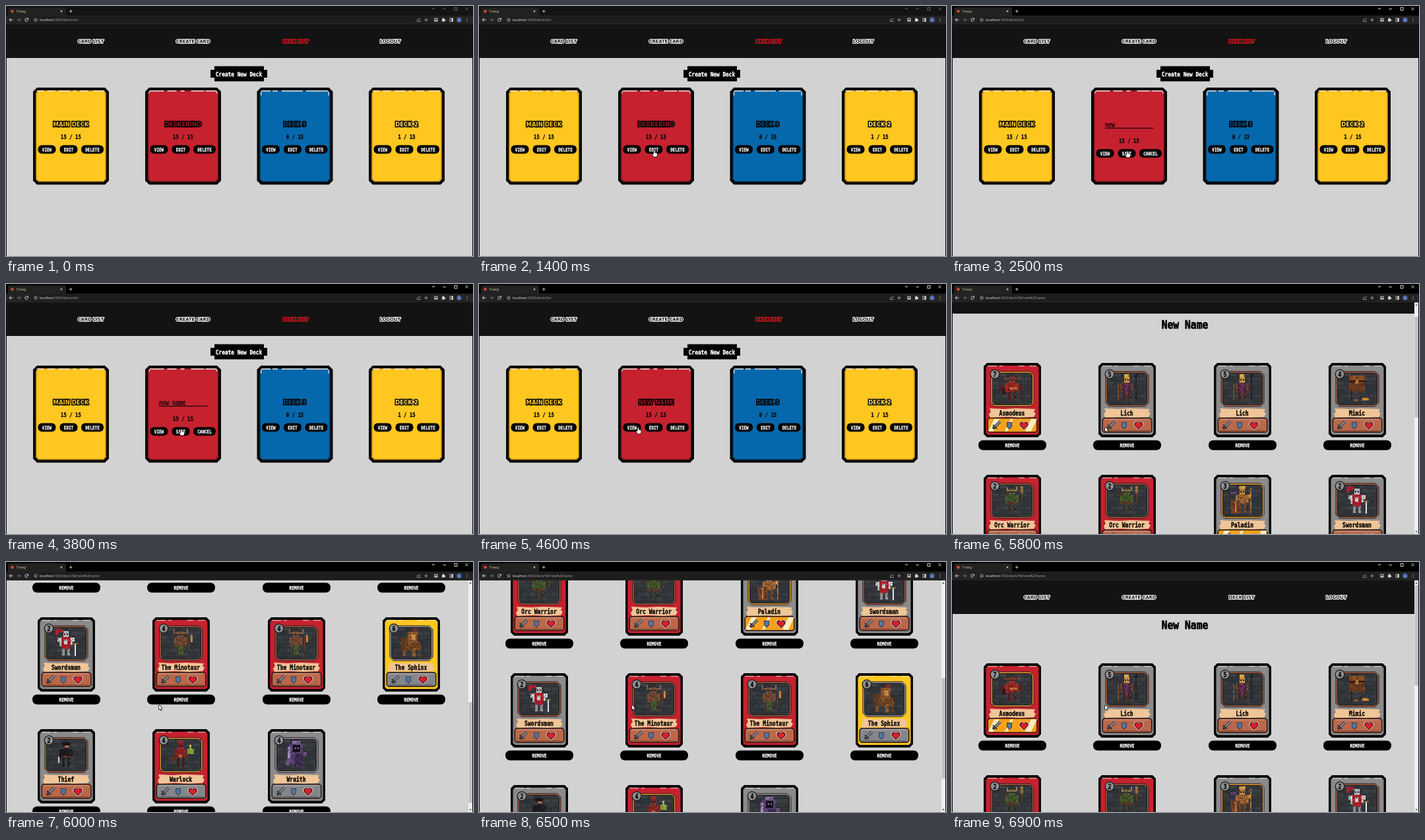
An HTML page with a canvas that plays this animation: 708 px wide and 380 px high, repeating every 7.2 s.

```html
<!DOCTYPE html>
<html lang="en">
<head>
<meta charset="utf-8">
<title>Deck list</title>
<style>
html, body { margin: 0; width: 708px; height: 380px; overflow: hidden; background: #000; }
canvas { display: block; }
</style>
</head>
<body>
<canvas id="stage" width="708" height="380"></canvas>
<script>
const ctx = document.getElementById('stage').getContext('2d');
const LOOP = 7200, STEP = 100;
const T = { focus: 1500, edit: 1600, saved: 3900, view: 5100, loaded: 5200, idle: 5500 };
const RED = '#c6212f', GOLD = '#ffc720', BLUE = '#0668ac', GREY = '#8a8a8b', CLAY = '#b9684a', AMBER = '#f7a11a', STEEL = '#85868a';

// time, scroll offset
const SCROLL = [[0, 0], [5800, 34], [5900, 225], [6000, 410], [6100, 421], [6200, 425],
  [6400, 410], [6500, 325], [6600, 190], [6700, 80], [6800, 20], [6900, 0]];
// time, x, y
const POINTER = [[100, 300, 386], [900, 265, 220], [1500, 265, 220], [1700, 265, 221], [4200, 265, 221], [4800, 232, 217.5], [LOOP, 232, 217.5]];

const rnd = n => { const s = Math.sin(n * 12.9898) * 43758.5453; return s - Math.floor(s); };

function rect(color, x, y, w, h) { ctx.fillStyle = color; ctx.fillRect(x, y, w, h); }
function poly(color, pts) {
  ctx.beginPath();
  pts.forEach(([x, y]) => ctx.lineTo(x, y));
  ctx.closePath();
  ctx.fillStyle = color;
  ctx.fill();
}
function octo(color, x, y, w, h, c) {
  const r = x + w, b = y + h;
  poly(color, [[x + c, y], [r - c, y], [r, y + c], [r, b - c], [r - c, b], [x + c, b], [x, b - c], [x, y + c]]);
}
function disc(color, x, y, r) {
  ctx.beginPath();
  ctx.arc(x, y, r, 0, 7);
  ctx.fillStyle = color;
  ctx.fill();
}
function line(color, width, ...pts) {
  ctx.beginPath();
  pts.forEach(([x, y]) => ctx.lineTo(x, y));
  ctx.strokeStyle = color;
  ctx.lineWidth = width;
  ctx.stroke();
}

// Tall monospace lettering; y is the middle of the capitals
function mono(text, x, y, advance, color, align = 'center', weight = 'bold') {
  const size = advance / 0.602;
  ctx.save();
  ctx.translate(x, y + size * 0.445);
  ctx.scale(1, 1.22);
  ctx.font = `${weight} ${size}px "DejaVu Sans Mono", monospace`;
  ctx.textAlign = align;
  ctx.fillStyle = ctx.strokeStyle = color;
  ctx.lineWidth = size * 0.04;
  ctx.fillText(text, 0, 0);
  ctx.strokeText(text, 0, 0);
  ctx.restore();
}
function outlined(text, x, y, size, edge, fill) {
  ctx.font = `bold ${size}px "DejaVu Sans", sans-serif`;
  ctx.textAlign = 'center';
  ctx.lineJoin = 'miter';
  ctx.miterLimit = 2;
  ctx.lineWidth = size * 0.34;
  ctx.strokeStyle = edge;
  ctx.strokeText(text, x, y + size * 0.365);
  ctx.fillStyle = fill;
  ctx.fillText(text, x, y + size * 0.365);
}
function ui(text, x, y, size, color) {
  ctx.font = `${size}px "Open Sans", sans-serif`;
  ctx.textAlign = 'left';
  ctx.fillStyle = color;
  ctx.fillText(text, x, y);
  return ctx.measureText(text).width;
}
function pill(text, x, y, w, h, advance) {
  ctx.beginPath();
  ctx.roundRect(x - w / 2, y - h / 2, w, h, h * 0.46);
  ctx.fillStyle = '#000';
  ctx.fill();
  mono(text, x, y, advance, '#fff');
}

// A block of shaded pixels for the creatures
function block(color, x, y, w, h) {
  rect(color, x, y, w, h);
  for (let i = 0; i < w; i += 2) for (let j = 0; j < h; j += 2) {
    const v = rnd((x + i) * 3.7 + (y + j) * 9.1);
    if (v < 0.25) rect('rgba(15,8,16,.3)', x + i, y + j, Math.min(2, w - i), Math.min(2, h - j));
    else if (v > 0.92) rect('rgba(255,235,200,.14)', x + i, y + j, Math.min(2, w - i), Math.min(2, h - j));
  }
}
function person(head, torso, legs, arms = torso) {
  block(legs, -6, 4, 4, 15);
  block(legs, 2, 4, 4, 15);
  block(arms, -10, -8, 3, 13);
  block(arms, 7, -8, 3, 11);
  block(torso, -7, -9, 14, 14);
  block(head, -4, -18, 8, 9);
  rect('#1c1214', -3, -14, 2, 2);
  rect('#1c1214', 1, -14, 2, 2);
}
function horns(color, w) {
  block(color, -w, -21, 2, 6);
  block(color, w - 2, -21, 2, 6);
  block(color, -w, -16, 2 * w, 2);
}

const CREATURES = {
  'Asmodeus'() {
    block('#5a2426', -19, -5, 36, 8);
    block('#45191d', -15, 1, 6, 8);
    person('#9b2a24', '#94261f', '#552020', '#a8321f');
    horns('#74402f', 12);
    block('#c07a3a', -3, -2, 10, 3);
    block('#3d2320', 14, -8, 2, 27);
  },
  'Lich'() {
    block('#74502e', -14, -7, 2, 26);
    person('#d09349', '#4b2d45', '#452a24', '#6e4331');
    block('#dba444', -4, -22, 7, 4);
    block('#73304e', -2, -8, 4, 20);
    block('#2a2021', 13, -19, 2, 36);
    block('#151419', 12, -22, 4, 4);
  },
  'Mimic'() {
    block('#6d3c1d', -12, -20, 24, 24);
    block('#894e24', -11, -20, 22, 7);
    rect('#2a1712', -12, -12, 24, 2);
    block('#b97e3a', -2, -13, 4, 6);
    block('#2d201c', -9, 4, 2, 14);
    block('#3a2920', 4, 4, 2, 12);
    block('#d2862c', 8, 14, 10, 4);
    block('#a86127', -4, 16, 5, 3);
  },
  'Orc Warrior'() {
    person('#46532a', '#3f5329', '#37342a', '#4d602d');
    horns('#a08250', 8);
    block('#5a3924', -8, 2, 15, 4);
    block('#493528', -15, -11, 9, 4);
    block('#a87b42', 13, -22, 4, 11);
    rect('#5a3b25', 14, -11, 2, 13);
  },
  'Paladin'() {
    person('#b98141', '#98602f', '#6f4428', '#ab7238');
    block('#cf9a4d', -5, -22, 10, 4);
    block('#76412a', -17, 0, 14, 20);
    block('#b98443', -11, 2, 2, 16);
    block('#71397f', -17, -13, 8, 3);
    block('#aa7039', 12, -19, 2, 39);
    block('#cf9a4d', 8, -9, 5, 5);
  },
  'Swordsman'() {
    person('#b9bbc1', '#b0242c', '#96979d', '#c6c8cd');
    block('#b41f2a', -16, -21, 11, 5);
    block('#b41f2a', -16, -16, 4, 4);
    block('#cfd1d6', -13, -8, 6, 6);
    block('#cfd1d6', 7, -8, 6, 6);
    block('#c6c8cd', -3, -5, 5, 7);
    block('#a5222b', -6, 4, 12, 5);
    rect('#dfe2e8', 13, 0, 2, 20);
    rect('#8b6a34', 10, 0, 8, 2);
  },
  'The Minotaur'() {
    person('#6a3f2e', '#704631', '#4c3227', '#7a4d36');
    horns('#8d6044', 11);
    block('#3f5a30', -4, 4, 8, 13);
    block('#c8853f', 15, -12, 3, 11);
    rect('#5e3a25', 12, -12, 2, 22);
  },
  'The Sphinx'() {
    block('#5b3a21', -16, -8, 12, 18);
    block('#70451f', -9, -2, 24, 13);
    block('#8a5428', -5, -17, 15, 17);
    block('#c08a48', 0, -13, 7, 8);
    block('#a22a24', 3, -22, 6, 4);
    block('#7a4c28', -13, 10, 5, 10);
    block('#8f5c30', 2, 8, 5, 13);
    block('#5f3d22', 11, 9, 4, 12);
  },
  'Thief'() {
    person('#232027', '#1d1b20', '#231f20');
    block('#b8723e', -2, -14, 6, 3);
    rect('#17151a', -6, -19, 12, 4);
    block('#6c3825', -7, 2, 14, 2);
    block('#c9ccd2', -12, 3, 2, 9);
  },
  'Warlock'() {
    person('#822525', '#8a2626', '#3f1d1c', '#702823');
    block('#952c29', -6, -22, 10, 4);
    block('#a06a37', -3, 0, 5, 4);
    block('#5a311f', -16, 3, 7, 7);
    block('#86a23d', 10, -9, 10, 8);
    block('#a9c152', 13, -15, 3, 7);
  },
  'Wraith'() {
    block('#5c4175', -11, -17, 21, 31);
    block('#8167a0', -6, -21, 12, 5);
    block('#a08abb', -13, -12, 4, 18);
    block('#3c2b4d', -2, -2, 13, 21);
    rect('#17131d', -5, -15, 11, 11);
    rect('#9c86b0', -2, -11, 2, 2);
    rect('#9c86b0', 2, -11, 2, 2);
    block('#6f5589', -16, 7, 6, 9);
    block('#6f5589', 11, -4, 5, 6);
  }
};

// name, cost, body, stat bar, window frame
const KIND = [
  ['Asmodeus', 7, RED, AMBER, '#e8a02c'], ['Lich', 5, GREY, CLAY, '#a4613f'], ['Mimic', 4, GREY, CLAY, '#a4613f'],
  ['Orc Warrior', 2, RED, CLAY, '#a4613f'], ['Paladin', 3, GREY, AMBER, '#e8a02c'], ['Swordsman', 2, GREY, CLAY, '#a4613f'],
  ['The Minotaur', 4, RED, CLAY, '#a4613f'], ['The Sphinx', 6, GOLD, STEEL, '#97989c'], ['Thief', 2, GREY, CLAY, '#a4613f'],
  ['Warlock', 4, RED, STEEL, '#d69a30'], ['Wraith', 4, GREY, STEEL, '#97989c']
];
const HAND = [0, 1, 1, 2, 3, 3, 4, 5, 5, 6, 6, 7, 8, 9, 10].map(i => KIND[i]);

function bricks() {
  rect('#2a2d32', -30, -25, 60, 50);
  for (let r = 0; r < 8; r++) for (let c = -1; c < 6; c++) {
    const v = 44 + Math.floor(rnd(r * 7 + c) * 18);
    rect(`rgb(${v},${v + 4},${v + 8})`, -30 + c * 11 + (r % 2) * 5, -24 + r * 6.5, 10, 5.5);
  }
}
function stats(x, y, bar) {
  octo('#2a1512', x - 37.5, y - 12, 76, 23, 3);
  octo(bar, x - 36, y - 10.5, 73, 20, 2);
  if (bar === AMBER) for (const [dx, w] of [[-33, 8], [-8, 4], [23, 9]])
    poly('rgba(255,248,225,.85)', [[x + dx + 6, y - 10], [x + dx + 6 + w, y - 10], [x + dx - 3 + w, y + 9], [x + dx - 3, y + 9]]);
  else {
    rect('rgba(255,255,255,.18)', x - 34, y - 10, 68, 2);
    rect('rgba(0,0,0,.22)', x - 34, y + 7, 68, 2);
  }
  line('#33333a', 4, [x - 29, y + 5], [x - 18, y - 6]);
  line('#8f97a6', 2, [x - 27, y + 3], [x - 18, y - 6]);
  line('#33333a', 2, [x - 29, y - 1], [x - 23, y + 5]);
  poly('#333c4b', [[x - 8, y - 5], [x, y - 5], [x, y + 2], [x - 4, y + 6], [x - 8, y + 2]]);
  poly('#56759f', [[x - 7, y - 4], [x - 1, y - 4], [x - 1, y + 1.5], [x - 4, y + 4.5], [x - 7, y + 1.5]]);
  for (const [k, color] of [[1.25, '#f0dcd4'], [1.08, '#2a0a0e'], [.88, '#d81f2e']]) {
    const h = (px, py) => [x + 18 + px * k, y + py * k];
    poly(color, [h(0, -3), h(2, -5), h(4, -5), h(6, -3), h(6, 0), h(0, 6), h(-6, 0), h(-6, -3), h(-4, -5), h(-2, -5)]);
  }
}
function card([name, cost, body, bar, frame], x, y) {
  octo('#070707', x - 43, y, 87, 113, 5);
  octo(body, x - 39.5, y + 4, 80, 105, 3);
  for (const [dx, w] of [[-37, 14], [-19, 5], [10, 9], [26, 11]]) rect('rgba(255,255,255,.6)', x + dx, y + 4, w, 1.3);
  octo('#28191a', x - 32.5, y + 12.5, 66, 54, 6);
  octo(frame, x - 31.5, y + 13.5, 64, 52, 5);
  octo('#1d1b1f', x - 30, y + 15, 61, 49, 4);
  ctx.save();
  ctx.beginPath();
  ctx.rect(x - 29, y + 16, 59, 47);
  ctx.clip();
  ctx.translate(x, y + 39);
  bricks();
  CREATURES[name]();
  ctx.restore();
  disc('#1b1b1d', x - 26, y + 17, 7.5);
  disc('#8d8e91', x - 26, y + 17, 6.2);
  mono(cost, x - 26, y + 17, 5, '#0c0c0c');
  poly('#f0c597', [[x - 34, y + 69], [x - 12, y + 70], [x + 6, y + 69], [x + 35, y + 70], [x + 33, y + 74],
    [x + 36, y + 77], [x + 33, y + 82], [x + 12, y + 83], [x - 8, y + 82], [x - 33, y + 83], [x - 35, y + 78], [x - 32, y + 74]]);
  mono(name, x, y + 76.3, 4.87, '#0c0805');
  stats(x, y + 95, bar);
  pill('REMOVE', x + 0.5, y + 125, 103, 15, 3.68);
}

const DASHES = {
  [GOLD]: [[-52, 11], [-36, 12], [-19, 17], [3, 5], [14, 12], [33, 18]],
  [RED]: [[-51, 22], [-24, 14], [-4, 6], [12, 20], [34, 17]],
  [BLUE]: [[-51, 14], [-34, 8], [-20, 32], [17, 33]]
};
const RIMS = { [GOLD]: '#a97812', [RED]: '#7c1620', [BLUE]: '#073e69' };

function deck(x, color, title, count, ink, edit) {
  octo('#050505', x - 57.5, 124, 115, 147.5, 6);
  octo(RIMS[color], x - 53.5, 128, 107, 139.5, 4);
  octo(color, x - 52, 129.5, 104, 136.5, 3);
  for (const [dx, w] of DASHES[color]) rect('#ece6dc', x + dx, 128.5, w, 1.5);
  if (color !== GOLD) for (const dx of [-52, 50.5]) rect('#dfe3e6', x + dx, 130, 1.3, color === BLUE ? 6 : 3);
  const drop = edit ? 6 : 0;
  if (edit) {
    mono(title, x - 36.5, 180, 5.03, '#140506', 'left', 'normal');
    rect('#140506', x - 36.5, 185, 73.5, 1.2);
  } else outlined(title, x, 179.5, 8.5, '#000', ink);
  mono(count, x, 198.5 + drop, 4.4, '#0a0a0a');
  pill('VIEW', x - 36.5, 218 + drop, 27, 13, 3.58);
  pill(edit ? 'SAVE' : 'EDIT', x - 3.5, 218 + drop, 27, 13, 3.58);
  pill(edit ? 'CANCEL' : 'DELETE', x + 32.5, 218 + drop, 34, 13, 3.58);
}

function nav(active) {
  rect('#131313', 0, 28, 708, 51);
  [['CARD LIST', 128.5], ['CREATE CARD', 283.5], ['DECK LIST', 439], ['LOGOUT', 582.5]].forEach(([label, x]) =>
    outlined(label, x, 53.5, 6.7, label === active ? '#e0131c' : '#fff', '#131313'));
}

function listPage(t) {
  nav('DECK LIST');
  rect('#000', 316, 91.5, 75, 23);
  rect('#000', 310, 97, 86, 12);
  mono('Create New Deck', 353, 103.5, 4.7, '#fff');
  const edit = t >= T.edit && t < T.saved;
  const typed = 'new name'.slice(0, Math.max(0, Math.floor((t - 1800) / 160)));
  deck(98.5, GOLD, 'MAIN DECK', '15 / 15', GOLD);
  deck(268.5, RED, edit ? typed : t < T.edit ? 'DECKERINO' : 'NEW NAME', '15 / 15', '#8a1822', edit);
  deck(438, BLUE, 'DECK 3', '0 / 15', '#0a4d80');
  deck(607.5, GOLD, 'DECK 2', '1 / 15', '#ffdc6a');
}

function deckPage(t, scroll) {
  ctx.save();
  ctx.translate(0, -scroll);
  nav();
  mono('New Name', 353, 95.5, 8.85, '#000');
  if (t < T.loaded) {
    mono('Looking a little empty in here...why not add some cards?', 353, 138.5, 5.87, '#050505');
    rect('#050505', 429, 143.5, 88, 1.2);
  } else HAND.forEach((c, i) => card(c, Math.round(91 + (i % 4) * 174.4), 154 + Math.floor(i / 4) * 170));
  ctx.restore();
  if (t >= T.loaded) {
    rect('#f1f1f1', 701, 28, 7, 352);
    rect('#c1c1c1', 701.5, 35 + scroll * 0.435, 5.5, 153);
    poly('#505050', [[704, 30.5], [705.7, 33], [702.3, 33]]);
    poly('#505050', [[702.3, 375.5], [705.7, 375.5], [704, 378]]);
  }
  if (t < T.idle) {
    rect('#080808', 0, 373, 234.5, 7);
    ui('Connecting...', 1, 378.3, 4.8, '#9a9a9a');
  }
}

function ring(color, x, y, r, from = 0, to = 6.3) {
  ctx.beginPath();
  ctx.arc(x, y, r, from, to);
  ctx.strokeStyle = color;
  ctx.lineWidth = 0.9;
  ctx.stroke();
}
function browser(t) {
  const on = t >= T.focus, tint = on ? '#e4e4e4' : '#6c6c6c', icon = '#d6d6d6';
  rect(on ? '#000' : '#131313', 0, 0, 708, 15);
  ctx.beginPath();
  ctx.roundRect(3, 2, 88, 16, 3);
  ctx.fillStyle = '#222';
  ctx.fill();
  rect('#232323', 0, 14.5, 708, 13.5);
  ctx.beginPath();
  ctx.roundRect(38, 16, 607, 10, 5);
  ctx.fillStyle = '#1d1d1d';
  ctx.fill();
  disc('#d2492a', 9.5, 8, 2.3);
  ui('Tnewg', 15.5, 9.8, 4.9, '#d3bf8c');
  const cross = (x, y, r, c) => { line(c, .9, [x - r, y - r], [x + r, y + r]); line(c, .9, [x + r, y - r], [x - r, y + r]); };
  cross(84, 8, 1.4, icon);
  line(icon, .9, [96, 8], [100.5, 8]);
  line(icon, .9, [98.2, 5.8], [98.2, 10.2]);
  line(tint, 1, [646, 3], [648, 5], [650, 3]);
  line(tint, .9, [662.5, 4.5], [667, 4.5]);
  ctx.strokeRect(680, 2.5, 4, 4);
  cross(698.5, 4.3, 2, tint);
  line(icon, 1, [10.5, 21], [5, 21]);
  line(icon, 1, [7.5, 18.5], [5, 21], [7.5, 23.5]);
  line('#777', 1, [16.5, 21], [22, 21]);
  line('#777', 1, [19.5, 18.5], [22, 21], [19.5, 23.5]);
  ring(icon, 31, 21, 2.3, 0.4, 5.6);
  poly(icon, [[34, 18], [34, 21], [31.5, 20.5]]);
  ring('#aaa', 45, 21, 2.3);
  rect('#aaa', 44.6, 20.5, .9, 2);
  const w = ui('localhost', 51, 22.7, 5.1, '#efefef');
  ui(t < T.view ? ':3000/decks/list' : ':3000/deck/58/new%20name', 51 + w, 22.7, 5.1, '#a5a5a5');
  line('#aaa', .8, [623.5, 20], [623.5, 23.5], [628, 23.5], [628, 21.5]);
  line('#aaa', .8, [625, 21.5], [626, 19.5], [628.5, 19]);
  poly('#bbb', Array.from({ length: 10 }, (_, i) => {
    const r = i % 2 ? 1.2 : 3, a = i * Math.PI / 5 - Math.PI / 2;
    return [637 + r * Math.cos(a), 21 + r * Math.sin(a)];
  }));
  disc('#1d1d1d', 637, 21, .9);
  rect(icon, 649.5, 18.5, 5, 5);
  rect('#232323', 650.5, 19.5, 3, 2);
  rect(icon, 661, 19.5, 4, 4);
  disc(icon, 663, 19, 1.1);
  disc(icon, 665.5, 21.5, 1.1);
  ctx.strokeStyle = icon;
  ctx.strokeRect(673, 18.8, 4.5, 4.5);
  rect(icon, 675.3, 18.8, 2.2, 4.5);
  disc('#4a63a8', 687, 21, 3.8);
  ui('L', 685.9, 22.8, 4.8, '#fff');
  for (const y of [19, 21, 23]) disc(icon, 699, y, .6);
  rect('#0a0a0a', 0, 28, 1, 352);
  rect('#0a0a0a', 707, 28, 1, 352);
}

function pointer(t) {
  if (t < POINTER[0][0]) return;
  const i = POINTER.findIndex(p => p[0] > t);
  const [t0, x0, y0] = POINTER[i - 1], [t1, x1, y1] = POINTER[i];
  const k = (t - t0) / (t1 - t0), e = k * k * (3 - 2 * k);
  const x = x0 + (x1 - x0) * e, y = y0 + (y1 - y0) * e;
  const overButton = t < T.view && y < 226 && (Math.abs(x - 232) < 13 || Math.abs(x - 265) < 13);
  const shape = overButton
    ? [[0, 0], [1.4, 0], [1.4, 3], [5, 4], [5, 7], [4, 9], [0, 9], [-2.2, 5.5], [-1.4, 4.8], [0, 6]]
    : [[0, 0], [0, 6.6], [1.5, 5.3], [2.6, 7.6], [3.6, 7.1], [2.6, 4.9], [4.6, 4.8]];
  const pts = shape.map(([a, b]) => [x + a, y + b]);
  line('#111', 1.6, ...pts, pts[0]);
  poly('#fff', pts);
}

function draw(t) {
  rect('#d2d2d2', 0, 0, 708, 380);
  if (t < T.view) listPage(t);
  else deckPage(t, SCROLL.filter(s => s[0] <= t).pop()[1]);
  browser(t);
  pointer(t);
}

const start = performance.now();
let shown = -1;
function tick() {
  const t = Math.floor(((performance.now() - start) % LOOP) / STEP) * STEP;
  if (t !== shown) draw(shown = t);
  requestAnimationFrame(tick);
}
tick();
</script>
</body>
</html>
```
